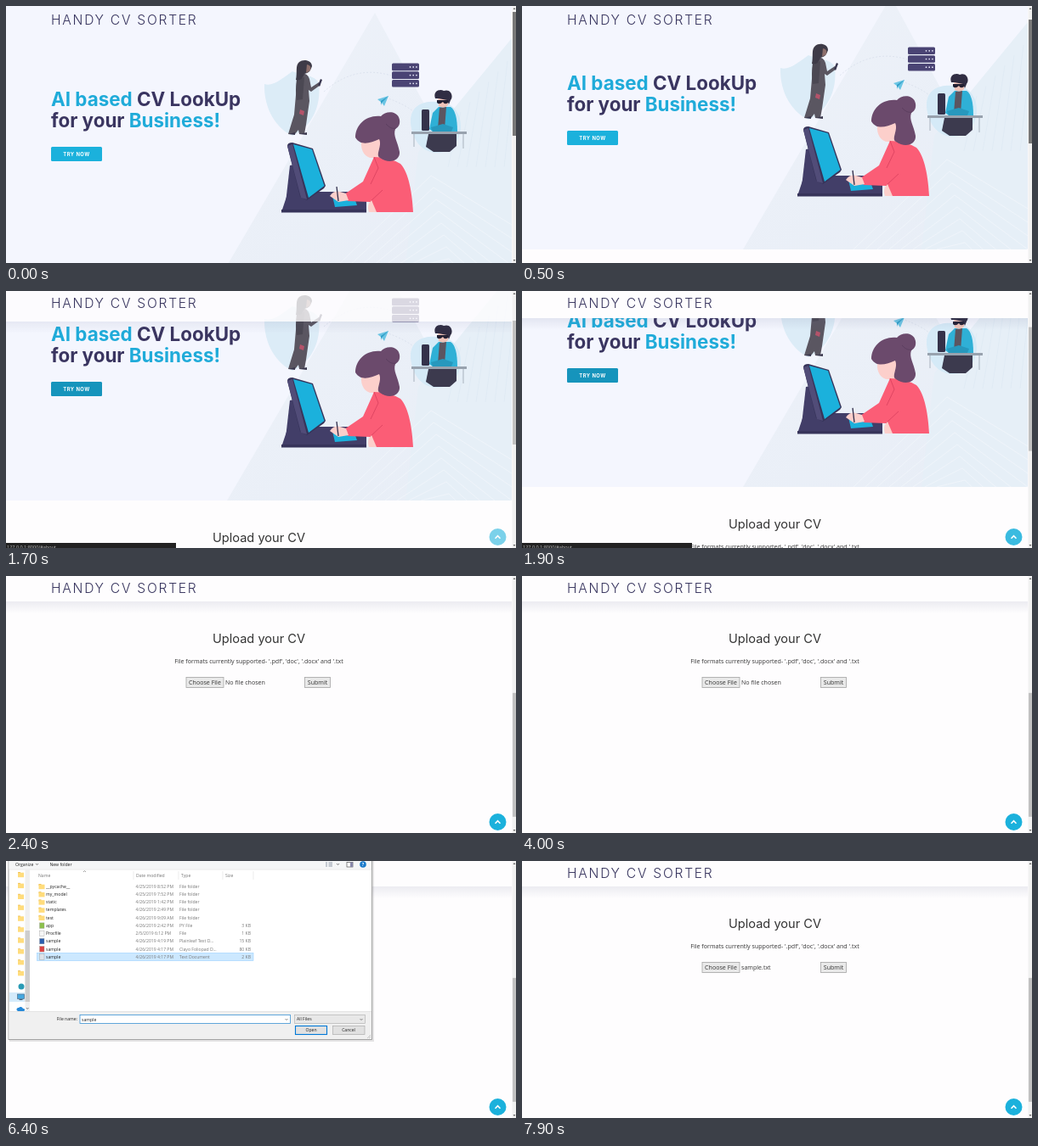
Write an HTML page that moves like this. It is 600 px wide and 303 px high and loops after 8000 ms.

```html
<!DOCTYPE html>
<html lang="en">
<head>
<meta charset="utf-8">
<title>CV upload demo</title>
<style>
html, body { margin: 0; width: 100%; height: 100%; overflow: hidden; background: #fefdfe; }
svg { display: block; width: 600px; height: 303px; }
text { font-family: "Open Sans", sans-serif; font-size: 7.08px; fill: #333; white-space: pre; }
text.head { font-family: Inter, sans-serif; }
text.big { font-size: 22.4px; font-weight: 700; fill: #3a3560; }
.dialog text { font-size: 5.1px; fill: #222; }
.dialog .dim { fill: #777; }
</style>
</head>
<body>
<svg viewBox="0 0 600 303">
  <defs>
    <linearGradient id="shade" x2="0" y2="1">
      <stop stop-color="#5a5f8a" stop-opacity=".11"/>
      <stop offset="1" stop-color="#5a5f8a" stop-opacity="0"/>
    </linearGradient>
    <linearGradient id="glass" x2="1" y2="1">
      <stop stop-color="#eef2f9"/><stop offset="1" stop-color="#e7edf6"/>
    </linearGradient>
    <clipPath id="heroClip"><path d="M0 0H595V306H0Z"/></clipPath>
  </defs>

  <g id="page">
    <g clip-path="url(#heroClip)">
      <path d="M0 0H595V306H0Z" fill="#f4f6fe"/>
      <path d="M260 306L434 8L595 306Z" fill="url(#glass)"/>
      <path d="M485 172L595 38V306H470Z" fill="#e6eff7"/>
      <g id="beams" fill="none" stroke="#f1f5fb" stroke-width=".9"/>
    </g>

    <text class="head big" x="53" y="118"><tspan fill="#1fabd9">AI based</tspan> CV LookUp</text>
    <text class="head big" x="53" y="143">for your <tspan fill="#1fabd9">Business!</tspan></text>
    <rect x="53" y="166" width="60" height="17" rx="1.5" fill="#1bb1dc"/>
    <rect id="tryHover" x="53" y="166" width="60" height="17" rx="1.5" fill="#0a4a6a"/>
    <text class="head" x="83" y="176.600" text-anchor="middle" style="font-size:5.8px;font-weight:700;fill:#fff;letter-spacing:.5px">TRY NOW</text>

    <!-- standing figure -->
    <path d="M304 92C314 96 328 83 337 77C350 82 366 82 368 92C371 117 360 143 337 153C319 145 303 122 304 92Z" fill="#dcecf7"/>
    <path d="M344 80Q354 77 357 86L359 96L368 90L370 93L359 101L356 99L357 112L353 140L351 151H345L344 146L340 151H332L339 128L341 105Z" fill="#5a5661"/>
    <path d="M342 86Q340 100 342 111L349 110L351 84Z" fill="#4b4853"/>
    <path d="M341 87C343 78 340 70 345 66C350 62 360 64 360 71C358 77 356 79 351 80Q348 89 341 87Z" fill="#3e3b48"/>
    <path d="M354 69Q360 70 358 76L353 79Z" fill="#8d6f6c"/>
    <path d="M367 93L370 86L372 87L369 95Z" fill="#3a3850"/>
    <path d="M346 122l5 2l-1 5l-5-2z" fill="#b4536a"/>
    <path d="M332 151l8-2v3zM345 151l9-2v3z" fill="#39364c"/>

    <!-- server, plane and links -->
    <path d="M374 101Q410 69 453 82M447 108Q472 117 481 126" fill="none" stroke="#d5dce8" stroke-width=".7" stroke-dasharray="2 2"/>
    <g id="server"></g>
    <path d="M437 110L450 106L445 118L442 114Z" fill="#6cc5e4"/>
    <path d="M442 114L450 106L441 112L441 117Z" fill="#2f9fc8"/>

    <!-- seated figure with laptop -->
    <path d="M476 138C475 116 493 112 506 113C527 112 536 128 535 144C533 162 523 173 506 173C489 172 478 158 476 138Z" fill="#d5eaf7"/>
    <path d="M497 151H530V165L522 172H503L494 166Z" fill="#3c3a4e"/>
    <path d="M502 126L509 119H523Q531 124 531 148H502L498 145Z" fill="#2fb0d6"/>
    <path d="M510 120L518 119L516 145H508Z" fill="#5c5560"/>
    <path d="M500 143L514 139L526 143L524 148L502 148Z" fill="#2798bd"/>
    <path d="M508 107H520V117Q515 122 509 118Z" fill="#efc3b8"/>
    <path d="M505 109C502 101 510 97 515 100C523 97 527 106 523 111L521 116L519 111L509 109Z" fill="#302d43"/>
    <path d="M507 111H520V114Q516 117 514 113Q510 117 507 114Z" fill="#222033"/>
    <rect x="489" y="122" width="9" height="25" rx="1.5" fill="#34324a"/>
    <path d="M477 148H542V151H477Z" fill="#98a2ae"/>
    <path d="M480 151V166M538 151V168" stroke="#b3bcc7" stroke-width="1.2"/>

    <!-- figure drawing at a desk -->
    <path d="M334 188L345 186L358 226L329 232Z" fill="#423e68"/>
    <path d="M324 243L332 219H424V243Z" fill="#423e68"/>
    <path d="M331 165Q331 161 337 161L361 168L376 212L374 215L354 229L346 225Z" fill="#37345a"/>
    <path d="M338 163L360 169L374.500 212L356 226Z" fill="#1bb1dc"/>
    <path d="M331 165L337 163L354 228L347 226Z" fill="#514c78"/>
    <path d="M384 224L408 221L413 235L387 237Z" fill="#1bb1dc"/>
    <path d="M418 160C418 149 436 144 444 153L442 176L446 187L431 189L432 179C423 180 417 171 418 160Z" fill="#fccfcb"/>
    <path d="M433 178Q450 178 464 186C474 196 478 222 479 243H433L428 231L402 230L398 222L420 207Z" fill="#fb5d76"/>
    <path d="M411 155C411 140 424 128 441 130C446 124 458 123 462 131C465 138 462 143 458 145C455 153 461 160 463 172C464 182 451 187 440 179C434 176 443 165 439 157C429 161 418 166 411 155Z" fill="#6b4a6c"/>
    <path d="M447 139Q453 146 459 144" fill="none" stroke="#573a5b" stroke-width=".7"/>
    <path d="M433 178L438 191L429 210M443 217L428 231" fill="none" stroke="#d93f5d" stroke-width=".8"/>
    <path d="M381 224Q386 217 393 219L400 221L403 229L391 231Z" fill="#fccfcb"/>
    <path d="M389 213L391 230" stroke="#2f2d4a" stroke-width="1.3"/>
    <path d="M427 243Q424 234 430 229L436 243Z" fill="#fccfcb"/>
    <path d="M324 240H424V243.500H324Z" fill="#37345a"/>

    <text class="head" x="297.500" y="355.300" text-anchor="middle" style="font-size:14.6px">Upload your CV</text>
    <text x="297.500" y="379" text-anchor="middle">File formats currently supported- '.pdf', 'doc', '.docx' and '.txt</text>
    <g stroke="#a5a5a5" stroke-width=".8">
      <rect id="choose" x="212" y="395.500" width="44" height="12"/>
      <rect x="351.500" y="395.500" width="30" height="12" fill="#e9e9e9"/>
    </g>
    <text x="234" y="404" text-anchor="middle">Choose File</text>
    <text id="chosen" x="258" y="404"></text>
    <text x="366.500" y="404" text-anchor="middle">Submit</text>
  </g>

  <g id="bar">
    <rect id="barFill" width="595" fill="#fefdfe"/>
    <rect id="barShade" width="595" height="14" fill="url(#shade)"/>
  </g>
  <text id="brand" class="head" x="53" style="font-size:15.6px;font-weight:300;letter-spacing:1.75px;fill:#37345e">HANDY CV SORTER</text>

  <g id="toTop">
    <circle cx="578.500" cy="290" r="10" fill="#1bb1dc"/>
    <path d="M575.500 291.700L578.500 288.700L581.500 291.700" fill="none" stroke="#fff" stroke-width="1.6"/>
  </g>
  <g id="status">
    <path d="M0 297H200V303H0Z" fill="#222"/>
    <text x="1" y="303.500" style="font-size:5.5px;fill:#bbb">127.0.0.1:8000/#about</text>
  </g>

  <path d="M595.500 0H600V303H595.500Z" fill="#f1f1f1"/>
  <path d="M596.500 4L598 2L599.500 4ZM596.500 299L598 301L599.500 299Z" fill="#666"/>
  <rect id="thumb" x="596" width="4" height="146"/>

  <g id="dialog" class="dialog"></g>
</svg>

<script>
const $ = id => document.getElementById(id);
const set = (id, attrs) => {
  for (const name in attrs) $(id).setAttribute(name, attrs[name]);
};
const rect = (x, y, w, h, fill, extra = '') =>
  `<rect x="${x}" y="${y}" width="${w}" height="${h}" fill="${fill}" ${extra}/>`;
const label = (x, y, s, extra = '') => `<text x="${x}" y="${y}" ${extra}>${s}</text>`;
const line = (d, color, width = .7) =>
  `<path d="${d}" fill="none" stroke="${color}" stroke-width="${width}"/>`;
const folder = (x, y) => rect(x, y - 3, 3, 2, '#e9b94e') + rect(x, y - 2.3, 7, 5.5, '#ffdc7c');
const range = n => [...Array(n).keys()];

$('beams').innerHTML = range(8).map(i =>
  `<path d="M${390 + i * 14} 306L${500 + i * 3} ${200 + i * 14}L595 ${258 + i * 16}"/>` +
  `<path d="M${520 + i * 11} 190L${535 + i * 11} ${125 - i * 12}" stroke="#dfeaf4"/>`).join('');

$('server').innerHTML = range(3).map(i => {
  const y = 67.6 + i * 9.7;
  return rect(454, y, 32, 8.6, '#4a4474', 'rx="1.5"') +
    range(3).map(j => `<circle cx="${475.5 + j * 3.7}" cy="${y + 4.3}" r=".85" fill="#eef"/>`).join('');
}).join('');

const files = [
  ['__pycache__', '4/25/2019 8:52 PM', 'File folder'],
  ['my_model', '4/25/2019 7:52 PM', 'File folder'],
  ['static', '4/26/2019 1:42 PM', 'File folder'],
  ['templates', '4/26/2019 2:49 PM', 'File folder'],
  ['test', '4/26/2019 9:09 AM', 'File folder'],
  ['app', '4/26/2019 2:42 PM', 'PY File', '3 KB', '#8cc04b'],
  ['Procfile', '2/5/2019 6:12 PM', 'File', '1 KB', '#f6f6f6'],
  ['sample', '4/26/2019 4:19 PM', 'Plainleaf Text D...', '15 KB', '#2b5fb0'],
  ['sample', '4/26/2019 4:17 PM', 'Clayo Foliopad D...', '80 KB', '#dd4444'],
  ['sample', '4/26/2019 4:17 PM', 'Text Document', '2 KB', '#dde3ea']
];
const rowY = i => 30 + i * 9.22;
const fileRow = ([name, date, type, size, color], i) => {
  const y = rowY(i), base = y + 1.8;
  return (color ? rect(39.5, y - 3.2, 5.5, 6.5, color, 'stroke="#999" stroke-width=".4"') : folder(38.5, y)) +
    label(47, base, name) + label(152.5, base, date, 'class="dim"') +
    label(204, base, type, 'class="dim"') +
    (size ? label(288, base, size, 'class="dim" text-anchor="end"') : '');
};

$('dialog').innerHTML =
  rect(4, -20, 429, 233, '#000', 'opacity=".1"') +
  rect(3, -20, 427.5, 230.5, '#fff', 'stroke="#8f8f8f" stroke-width=".8"') +
  rect(3.5, -20, 426.5, 29.5, '#f5f6f7') +
  label(11, 5.7, 'Organize') + label(51.5, 5.7, 'New folder') +
  line('M35 3L36.5 4.5L38 3M389 3L390.5 4.5L392 3', '#444') +
  line('M376 2H378M379.5 2H384M376 4H378M379.5 4H384M376 6H378M379.5 6H384', '#68778a') +
  rect(401, 1.5, 7, 5.5, '#fff', 'stroke="#555" stroke-width=".7"') + rect(405, 1.5, 3, 5.5, '#88a') +
  '<circle cx="420" cy="4" r="3.8" fill="#1979ca"/>' +
  label(420, 5.8, '?', 'text-anchor="middle" style="fill:#fff;font-weight:700"') +
  line('M3 10H430', '#e0e0e0') +
  range(10).map(i => folder(14, 16 + i * 12.9)).join('') +
  rect(4, 155, 18, 11, '#d4ebfb') +
  '<circle cx="18" cy="148" r="3.5" fill="#2a9bb5"/>' +
  rect(13.5, 157, 8, 5.5, '#45a8e0', 'stroke="#46617a" stroke-width=".6"') + rect(15.5, 163, 4, 1, '#46617a') +
  '<path d="M14 177a2 2 0 0 1 1-4a3 3 0 0 1 5 1a1.5 1.5 0 0 1 1 3z" fill="#2589d8"/>' +
  rect(22.5, 10, 5.5, 167, '#f0f0f0') + rect(22.5, 82, 5.5, 84, '#cdcdcd') +
  line('M24 173L25.3 174.5L26.6 173', '#555') +
  label(38, 18.5, 'Name', 'class="dim"') + label(153, 18.5, 'Date modified', 'class="dim"') +
  label(206, 18.5, 'Type', 'class="dim"') + label(258, 18.5, 'Size', 'class="dim"') +
  line('M150 12V22M203 12V22M255 12V22M291 12V22', '#e4e4e4') + line('M91 13L92.5 11.5L94 13', '#777') +
  '<rect id="pick" x="36.5" width="254.5" height="9" stroke-width=".6"/>' +
  files.map(fileRow).join('') +
  rect(3.5, 177.5, 426.5, 32.5, '#f0f0f0') + line('M3 177.5H430', '#ddd') +
  label(84, 188, 'File name:', 'text-anchor="end"') +
  rect(87, 181.5, 247.5, 10, '#fff', 'stroke="#3c93d4" stroke-width=".8"') +
  '<text id="fileName" x="89" y="188.5"></text>' +
  rect(339.5, 181.5, 83, 10, '#e8e8e8', 'stroke="#b5b5b5" stroke-width=".7"') + label(342, 188.3, 'All Files') +
  line('M328.5 186L330 187.5L331.5 186M416.5 186L418 187.5L419.5 186', '#555') +
  '<rect id="open" x="340.5" y="194.5" width="37" height="10" stroke="#0078d7" stroke-width="1.1"/>' +
  rect(384.5, 194.5, 37.5, 10, '#e1e1e1', 'stroke="#adadad" stroke-width=".7"') +
  label(359, 201.3, 'Open', 'text-anchor="middle"') + label(403, 201.3, 'Cancel', 'text-anchor="middle"') +
  line('M425 209L429 205M427 209L429 207', '#aaa', .6);

function draw(t) {
  const ramp = (a, b) => Math.min(1, Math.max(0, (t - a) / (b - a)));
  const between = (a, b) => t >= a && t < b;
  const jump = ramp(1800, 2400);
  const eased = jump * jump * (3 - 2 * jump);
  const scroll = 42 * ramp(0, 1100) + 17 * ramp(1200, 1700) + 217 * eased;

  set('page', { transform: `translate(0 ${-scroll})` });
  set('thumb', { y: 7 + scroll * .474, fill: t < 1000 ? '#787878' : '#c1c1c1' });
  set('tryHover', { opacity: .28 * ramp(1400, 1700) });

  const barHeight = 36 - 6 * ramp(1700, 2000);
  set('bar', { opacity: ramp(1300, 1800) });
  set('barFill', { height: barHeight });
  set('barShade', { y: barHeight });
  set('brand', { y: 22.2 - 2 * ramp(1300, 1700) });
  set('toTop', { opacity: ramp(1300, 2000) });
  set('status', { opacity: between(1600, 2100) ? 1 : 0 });

  set('choose', between(4600, 7800)
    ? { fill: '#dedede', stroke: '#8a8a8a' }
    : { fill: '#e9e9e9', stroke: '#a5a5a5' });
  $('chosen').textContent = t < 7400 ? 'No file chosen' : 'sample.txt';

  const shown = ramp(4985, 5285) * (1 - ramp(7200, 7400));
  const scale = .92 + .08 * shown;
  set('dialog', { opacity: shown, transform: `translate(216 143) scale(${scale}) translate(-216 -143)` });

  // The pointer moves down the list before the last file is picked.
  const picked = t >= 6200;
  const row = picked ? 9 : Math.round(9 * ramp(5600, 6100));
  set('pick', {
    y: rowY(row) - 4.5,
    fill: picked ? '#cce8ff' : '#e5f3ff',
    stroke: picked ? '#99d1ff' : 'none',
    opacity: t < 5600 ? 0 : 1
  });
  $('fileName').textContent = picked ? 'sample' : '';
  set('open', { fill: t >= 7000 ? '#d5eaf9' : '#e1e1e1' });
}

function tick() {
  draw(Math.floor(performance.now() % 8000 / 100) * 100);
  requestAnimationFrame(tick);
}
tick();
</script>
</body>
</html>
```
